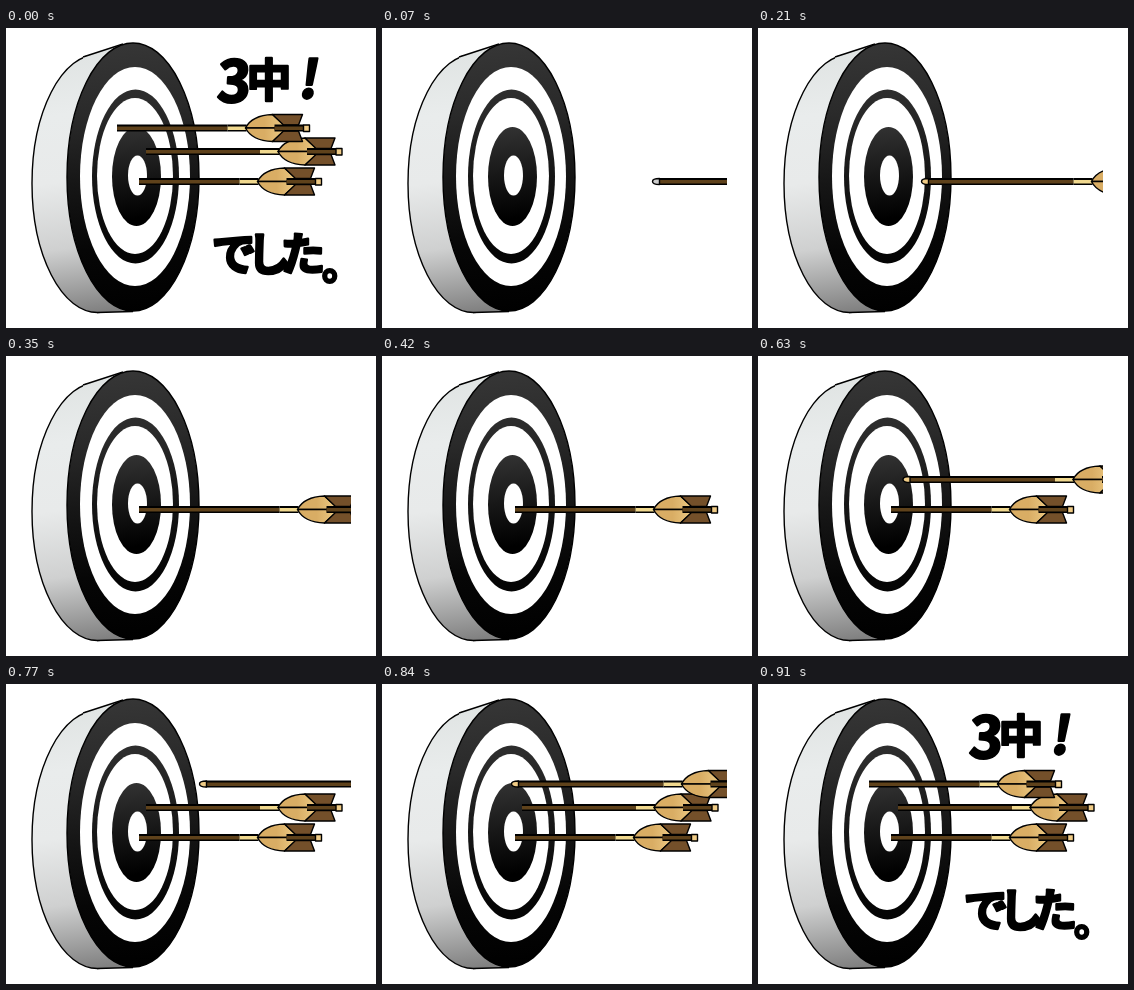
These frames come from a looping animation (370 px wide and 300 px high, 0.98 s). An HTML page with a canvas:

```html
<!DOCTYPE html>
<html lang="ja">
<head>
<meta charset="utf-8">
<style>
html, body { margin: 0; width: 100%; height: 100%; overflow: hidden; background: #fff; }
canvas { display: block; }
</style>
</head>
<body>
<canvas id="stage" width="370" height="300"></canvas>
<script>
const ctx = document.getElementById('stage').getContext('2d');
const STEP = 70, STEPS = 14, RIGHT_EDGE = 345;
const BROWN = '#5f421b', VANE = '#74502a', TAN = '#efcb86', BINDING = '#f0d88e';

// x, y: resting front of the feathers; entry: where the shaft meets the board;
// travel: distance still to fly at each step from `start`
const arrows = [
  { x: 251.5, y: 154, entry: 133, start: 1, travel: [189, 135, 82, 61, 40, 20] },
  { x: 272, y: 124, entry: 140, start: 8, travel: [87, 43] },
  { x: 239.5, y: 100.5, entry: 111, start: 11, travel: [124, 60] }
];

function ellipse(x, y, rx, ry, fill) {
  ctx.beginPath();
  ctx.ellipse(x, y, rx, ry, 0, 0, Math.PI * 2);
  ctx.fillStyle = fill;
  ctx.fill();
}

function shade(x0, y0, x1, y1, ...colors) {
  const g = ctx.createLinearGradient(x0, y0, x1, y1);
  colors.forEach((c, i) => g.addColorStop(i / (colors.length - 1), c));
  return g;
}

function drawTarget() {
  const side = shade(50, 20, 85, 285, '#dfe3e2', '#e9ecec', '#e8eaea', '#cfd0d0', '#808080');
  ctx.strokeStyle = '#000';
  ctx.lineWidth = 1.4;
  ellipse(91.5, 155.5, 65.5, 129, side);
  ctx.stroke();
  // fill the band between the rims
  ctx.beginPath();
  ctx.moveTo(77, 29);
  ctx.lineTo(117, 16);
  ctx.lineTo(127, 283.5);
  ctx.lineTo(91, 284.5);
  ctx.closePath();
  ctx.fillStyle = side;
  ctx.fill();
  ctx.beginPath();
  ctx.moveTo(77, 29);
  ctx.lineTo(117, 16);
  ctx.moveTo(91, 284.5);
  ctx.lineTo(127, 283.5);
  ctx.stroke();

  const ink = shade(115, 15, 145, 283, '#363636', '#2a2a2a', '#161616', '#060606', '#000');
  ellipse(127, 149, 66, 134, ink);
  ctx.stroke();
  ellipse(129, 148.5, 55, 109.5, '#fff');
  ellipse(129.5, 148.5, 43.5, 87, ink);
  ellipse(129, 148, 38, 78, '#fff');
  ellipse(130.5, 148.5, 24.5, 49.5, shade(125, 99, 135, 190, '#323232', '#181818', '#000'));
  ellipse(131.5, 147.5, 9.5, 20, '#fff');
}

function polygon(fill, ...points) {
  ctx.beginPath();
  points.forEach(([x, y]) => ctx.lineTo(x, y));
  ctx.closePath();
  ctx.fillStyle = fill;
  ctx.fill();
  ctx.stroke();
}

function rod(x0, x1, fill) {
  ctx.fillStyle = '#000';
  ctx.fillRect(x0, -3.5, x1 - x0, 7);
  ctx.fillStyle = fill;
  ctx.fillRect(x0, -1.5, x1 - x0, 3.5);
}

function drawArrow({ x, y, entry }, offset, tipColor) {
  ctx.save();
  ctx.beginPath();
  ctx.rect(entry, 0, RIGHT_EDGE - entry, 300);
  ctx.clip();
  ctx.translate(x + offset, y - 0.5);
  ctx.strokeStyle = '#000';
  ctx.lineWidth = 1.4;
  ctx.lineJoin = 'round';

  rod(-164, -18, BROWN);
  rod(-18, 1, BINDING);
  ctx.beginPath();
  ctx.moveTo(-163, -3);
  ctx.quadraticCurveTo(-170, -3, -170, 0);
  ctx.quadraticCurveTo(-170, 3, -163, 3);
  ctx.closePath();
  ctx.fillStyle = tipColor;
  ctx.fill();
  ctx.stroke();

  const leaf = shade(0, 0, 38, 0, '#d9ad64', '#d9ad64', '#ecc983');
  for (const side of [-1, 1]) {
    ctx.beginPath();
    ctx.moveTo(0, 0);
    ctx.bezierCurveTo(4, side * 8, 14, side * 13, 27, side * 13.5);
    ctx.lineTo(42, 0);
    ctx.closePath();
    ctx.fillStyle = leaf;
    ctx.fill();
    ctx.stroke();
    polygon(VANE, [27, side * 13.5], [57, side * 13.5], [53, side * 3], [38, side * 3]);
  }
  rod(29, 58, BROWN);
  polygon(TAN, [58, -3], [64, -3], [64, 3.5], [58, 3.5]);
  ctx.restore();
}

function glyph(char, x, y, size, slant = 0) {
  ctx.save();
  ctx.transform(1, 0, -slant, 1, x, y);
  ctx.font = `900 ${size}px "Noto Sans CJK JP", "Noto Sans CJK", sans-serif`;
  ctx.textAlign = 'center';
  ctx.fillStyle = ctx.strokeStyle = '#000';
  ctx.lineWidth = 2.4;
  ctx.lineJoin = 'round';
  ctx.fillText(char, 0, 0);
  ctx.strokeText(char, 0, 0);
  ctx.restore();
}

function drawCaption() {
  glyph('3', 227, 74, 57, 0.06);
  glyph('中', 263, 69, 45);
  glyph('!', 301, 70, 52, 0.16);
  glyph('で', 228, 243, 45);
  glyph('し', 263, 243, 45);
  glyph('た', 297, 243, 45);
  glyph('。', 336, 251, 40);
}

function draw(step) {
  ctx.fillStyle = '#fff';
  ctx.fillRect(0, 0, 370, 300);
  drawTarget();
  const shot = step || STEPS - 1;
  for (const arrow of arrows) {
    const age = shot - arrow.start;
    if (age >= 0) drawArrow(arrow, arrow.travel[age] ?? 0, shot === 1 ? '#ccc' : TAN);
  }
  if (shot === STEPS - 1) drawCaption();
}

const begin = performance.now();
function tick() {
  draw(Math.floor((performance.now() - begin) / STEP) % STEPS);
  requestAnimationFrame(tick);
}
tick();
</script>
</body>
</html>
```
